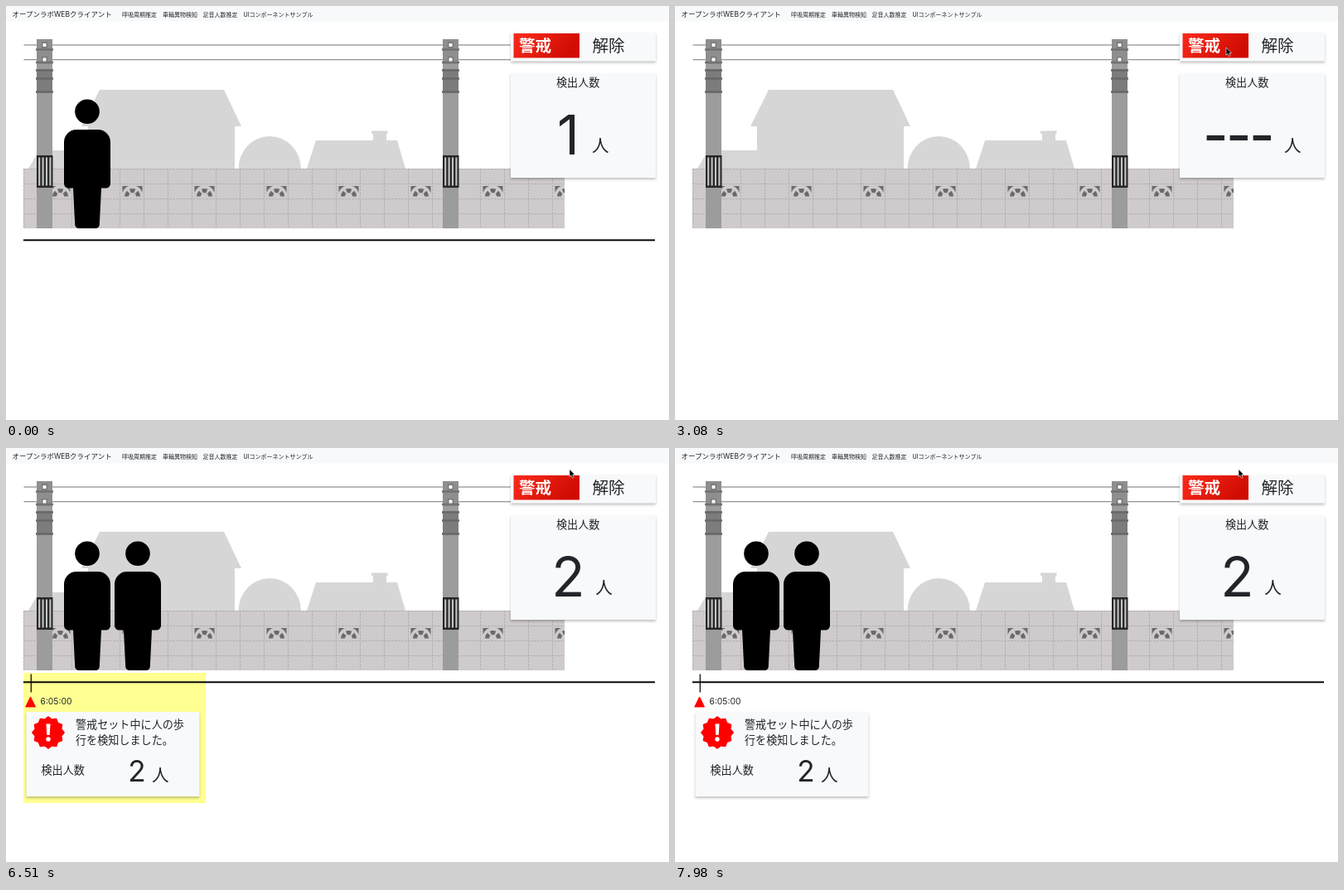
Write an HTML page that moves like this. It is 800 px wide and 499 px high and loops after 8000 ms.

```html
<!DOCTYPE html>
<html lang="ja">
<head>
<meta charset="utf-8">
<title>足音人数推定</title>
<style>
  html, body { margin: 0; width: 100%; height: 100%; overflow: hidden; background: #fff; }
  svg { display: block; width: 800px; height: 499px; }
  text { font-family: Inter, "Noto Sans CJK JP", "Noto Sans CJK", sans-serif; fill: #212529; }
  .panel { fill: #f8f9fb; filter: drop-shadow(0 2px 1.5px rgba(0, 0, 0, .24)); }
  .label { font-size: 19.6px; }
  .label.on { font-weight: 700; fill: #fff; }
  .nav { font-size: 7px; }
  .body { font-size: 13.1px; }
  .unit { font-size: 20.6px; }
  .big { font-size: 66px; }
</style>
</head>
<body>
<svg viewBox="0 0 800 499">
  <defs>
    <linearGradient id="red" x2="1" y2=".35">
      <stop stop-color="#fb2b1c"/><stop offset="1" stop-color="#d00c02"/>
    </linearGradient>
    <linearGradient id="green" x2="1" y2=".35">
      <stop stop-color="#20a795"/><stop offset="1" stop-color="#0cae58"/>
    </linearGradient>
    <clipPath id="ground"><rect width="800" height="268"/></clipPath>
    <clipPath id="wallClip"><rect x="21" y="196" width="653" height="72"/></clipPath>

    <g id="vent" fill="#6c696a">
      <path d="M-12 217h7.5a13 13 0 0 0-7.5 8zM12 217h-7.5a13 13 0 0 1 7.5 8z"/>
      <path d="M-7 229.5a7 7 0 0 1 14 0" fill="none" stroke="#6c696a" stroke-width="5" stroke-dasharray="5.6 2.6"/>
    </g>

    <g id="pole">
      <rect x="37" y="40" width="19" height="228" fill="#9c9c9c"/>
      <rect x="37" y="40" width="19" height="30" fill="#8e8e8e"/>
      <path d="M36 52.5h21M36 68h21" stroke="#717171" stroke-width="2.5"/>
      <rect x="37" y="76" width="19" height="29" fill="#7c7c7c"/>
      <path d="M36 77.5h21M36 87.5h21M36 103.5h21" stroke="#686868" stroke-width="2.5"/>
      <path d="M43 43.500h7v7h-7zM43 61h7v7h-7z" fill="#777"/>
      <path d="M44.500 45h4v4h-4zM44.500 62.500h4v4h-4z" fill="#fff"/>
      <rect x="37" y="180" width="19.500" height="39" fill="#262626"/>
      <path d="M40.200 182.500v34M44.600 182.500v34M49 182.500v34M53.400 182.500v34" stroke="#c4c4c4" stroke-width="2.1"/>
    </g>

    <g id="person">
      <circle cx="98" cy="127.300" r="14.800"/>
      <path d="M85 149h26a15 15 0 0 1 15 15v50a5.500 5.500 0 0 1-5.500 5.500H115l-2.200 44a5 5 0 0 1-5 4.500H88.200a5 5 0 0 1-5-4.500L81 219.500h-5.500A5.500 5.500 0 0 1 70 214v-50a15 15 0 0 1 15-15z"/>
    </g>
  </defs>

  <rect width="800" height="499" fill="#fff"/>
  <rect width="800" height="18.500" fill="#f8f9fb"/>
  <text x="7.500" y="13.200" font-size="8.500">オープンラボWEBクライアント</text>
  <text class="nav" x="140" y="13">呼吸周期推定</text>
  <text class="nav" x="189" y="13">車輪異物検知</text>
  <text class="nav" x="237.500" y="13">足音人数推定</text>
  <text class="nav" x="286.500" y="13">UIコンポーネントサンプル</text>

  <g fill="#d6d6d6">
    <path d="M27 196l13-22h59v-29h-8l22-44h150l21 44h-8v51z"/>
    <path d="M280.500 196a37.700 39 0 0 1 75.400 0z"/>
    <path d="M363 196l11-34h69v-8h-2v-3.500h19.500v3.500h-1.500v8h13l10 34z"/>
  </g>
  <path d="M21.500 47H609M21.500 64.700H609" stroke="#777" stroke-width="1.100"/>

  <g clip-path="url(#wallClip)">
    <rect x="21" y="196" width="653" height="72" fill="#cfcacb"/>
    <g id="bricks" stroke="#b5b0b1" stroke-width="1" stroke-dasharray="3 1"></g>
    <g id="vents"></g>
  </g>
  <use href="#pole"/>
  <use href="#pole" x="490"/>

  <g clip-path="url(#ground)">
    <g id="people">
      <use href="#person"/>
      <use id="second" href="#person" x="61"/>
    </g>
  </g>

  <g id="log">
    <rect id="flash" x="21" y="271" width="220" height="157"/>
    <path d="M30.300 272.500v22" stroke="#111" stroke-width="1.300"/>
    <path d="M29.600 300l5.900 12H23.700z" fill="#f00" stroke="#f00" stroke-linejoin="round"/>
    <text x="41.500" y="309.300" font-size="10.300">6:05:00</text>
    <rect class="panel" x="24.500" y="318" width="209" height="102"/>
    <path id="badge" fill="#f00" stroke="#f00" stroke-width="2" stroke-linejoin="round"/>
    <path d="M48.500 332.500h5l-.8 13.500h-3.400z" fill="#fff"/>
    <circle cx="51" cy="351" r="2.700" fill="#fff"/>
    <text class="body" x="84" y="338">警戒セット中に人の歩</text>
    <text class="body" x="84" y="357">行を検知しました。</text>
    <text class="body" x="42.500" y="392.500">検出人数</text>
    <text x="158" y="402" font-size="35" text-anchor="middle">2</text>
    <text class="unit" x="176" y="401.500">人</text>
  </g>
  <path id="axis" d="M21 282.200H783" stroke="#0a0a0a" stroke-width="2"/>

  <rect class="panel" x="609" y="32" width="175" height="34.500"/>
  <rect id="alertBg" x="612.500" y="33" width="79.500" height="29.500" fill="url(#red)"/>
  <rect id="clearBg" x="700.500" y="33" width="79.500" height="29.500" fill="url(#green)"/>
  <text id="alert" class="label" x="619" y="55">警戒</text>
  <text id="clear" class="label" x="707.500" y="55">解除</text>

  <rect class="panel" x="609" y="81" width="175" height="126"/>
  <text class="body" x="664" y="97.300">検出人数</text>
  <text id="count" class="big" x="678.500" y="178.500" text-anchor="middle"></text>
  <text id="dashes" class="big" x="637 665 693" y="178.500" font-weight="500">---</text>
  <text id="unit" class="unit" y="176">人</text>

  <path id="pointer" d="M0 0v9.200l2-1.800 1.500 3.300 1.600-.7-1.400-3.200h2.800z" fill="#000" stroke="#fff" stroke-width=".6"/>
</svg>
<script>
const LOOP = 8000, STEP = 70;
const RESET = 840, CLICK = 2800, DETECT = 6230, LOG = 6300, FADE = 1470;
const RISE_START = 6170, RISE_TIME = 300, RISE = 156;
const POINTER = [[1540, 700, 112], [2100, 665, 50], [3290, 665, 50], [3570, 680, 25.5]];

const $ = id => document.getElementById(id);
const show = (id, on) => $(id).setAttribute('visibility', on ? 'visible' : 'hidden');
const clamp = v => Math.min(1, Math.max(0, v));
const mix = (a, b, k) => a + (b - a) * k;

// CSS "ease": cubic-bezier(.25, .1, .25, 1)
function ease(x) {
  let lo = 0, hi = 1, u = x;
  for (let i = 0; i < 24; i++) {
    u = (lo + hi) / 2;
    const bx = .75 * u * (1 - u) + u ** 3;
    if (bx < x) lo = u; else hi = u;
  }
  return .3 * u * (1 - u) ** 2 + 3 * u * u * (1 - u) + u ** 3;
}

function build() {
  let lines = '';
  for (let y = 196.5; y < 268; y += 18) lines += `M21 ${y}H674`;
  for (let x = 21.5; x < 674; x += 29) lines += `M${x} 196V268`;
  $('bricks').innerHTML = `<path d="${lines}" fill="none"/>`;

  let vents = '';
  for (let x = 65.5; x < 690; x += 87) vents += `<use href="#vent" x="${x}"/>`;
  $('vents').innerHTML = vents;

  const points = Array.from({ length: 24 }, (_, i) => {
    const a = i * Math.PI / 12, r = i % 2 ? 16 : 18.8;
    return `${51 + r * Math.sin(a)} ${343 - r * Math.cos(a)}`;
  });
  $('badge').setAttribute('d', `M${points.join('L')}Z`);
}

function pointerAt(t) {
  let i = 0;
  while (i < POINTER.length - 2 && t >= POINTER[i + 1][0]) i++;
  const [t0, x0, y0] = POINTER[i], [t1, x1, y1] = POINTER[i + 1];
  const k = ease(clamp((t - t0) / (t1 - t0)));
  return [mix(x0, x1, k), mix(y0, y1, k)];
}

function draw(t) {
  const before = t < RESET, after = t >= DETECT;
  const armed = before || t >= CLICK;
  const busy = before || after;

  show('alertBg', armed);
  show('clearBg', !armed);
  $('alert').classList.toggle('on', armed);
  $('clear').classList.toggle('on', !armed);

  show('dashes', !busy);
  $('count').textContent = before ? '1' : after ? '2' : '';
  $('unit').setAttribute('x', before ? 707 : after ? 711.3 : 735);

  show('axis', busy);
  show('people', busy);
  show('second', after);
  const rise = after ? ease(clamp((t - RISE_START) / RISE_TIME)) : 1;
  $('people').setAttribute('transform', `translate(0 ${RISE * (1 - rise)})`);

  show('log', t >= LOG);
  const blue = Math.round(mix(128, 255, clamp((t - LOG) / FADE)));
  $('flash').setAttribute('fill', `rgb(255,255,${blue})`);

  show('pointer', t >= POINTER[0][0]);
  $('pointer').setAttribute('transform', `translate(${pointerAt(t)})`);
}

function tick() {
  const t = performance.now() % LOOP;
  draw(Math.floor(t / STEP) * STEP);
  requestAnimationFrame(tick);
}

build();
tick();
</script>
</body>
</html>
```
